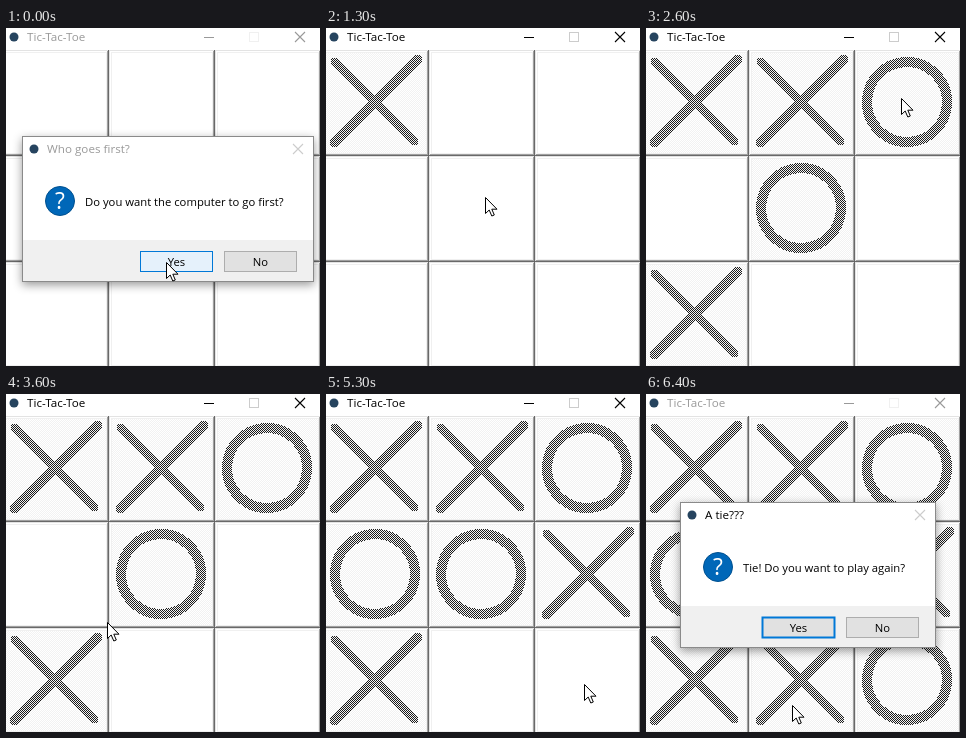
These frames come from a looping animation (314 by 338 pixels, 6500 ms). An HTML page:

```html
<!DOCTYPE html>
<html lang="en">
<head>
<meta charset="utf-8">
<title>Noughts and crosses</title>
<style>
  html, body { margin: 0; width: 100%; height: 100%; overflow: hidden; background: #fff; }
  svg { display: block; }
  text { font: 11.27px "Open Sans", "Noto Sans", sans-serif; white-space: pre; }
  .title { font-size: 11.65px; }
  .mid { text-anchor: middle; }
  .dialog { filter: drop-shadow(0 3px 5px rgba(0, 0, 0, .4)); }
  .crisp { shape-rendering: crispEdges; }
</style>
</head>
<body>
<svg id="stage" width="314" height="338" viewBox="0 0 314 338"></svg>
<script>
const LOOP = 6500, STEP = 100;

// [time, x, y] of the pointer tip
const path = [
  [0, 160, 234], [500, 158, 237], [900, 158, 237], [1300, 159, 169],
  [2000, 159, 169], [2500, 255, 70], [2800, 255, 70],
  [3300, 150, 285], [3500, 108, 248], [3600, 101, 228], [4000, 49, 184],
  [4500, 49, 184], [4900, 142, 251], [5300, 258, 290], [5900, 258, 290],
  [6400, 146, 311]
];

// [time, mark, column, row]
const moves = [
  [700, 'X', 0, 0], [1400, 'O', 1, 1], [1400, 'X', 1, 0],
  [2600, 'O', 2, 0], [2600, 'X', 0, 2], [4300, 'O', 0, 1],
  [4300, 'X', 2, 1], [5800, 'O', 2, 2], [5800, 'X', 1, 2]
];

const rect = (x, y, w, h, fill, more = '') =>
  `<rect x="${x}" y="${y}" width="${w}" height="${h}" fill="${fill}" ${more}/>`;

const text = (x, y, words, more = '') => `<text x="${x}" y="${y}" ${more}>${words}</text>`;

const cross = (x, y, more) =>
  `<path d="M${x} ${y}l10 10m0-10l-10 10" fill="none" stroke-width="1.1" ${more}/>`;

const icon = (x, y) => `<circle cx="${x}" cy="${y}" r="4.5" fill="#26445f"/>`;

// Raised button with a light top left and a dark bottom right edge
function cell(col, row) {
  return `<g class="crisp" transform="translate(${106 * col - 3} ${106 * row + 22})">
    ${rect(0, 0, 106, 106, '#696969')}${rect(0, 0, 105, 105, '#e3e3e3')}
    ${rect(1, 1, 104, 104, '#a0a0a0')}${rect(1, 1, 103, 103, '#fff')}
    ${rect(2, 2, 102, 102, '#f0f0f0')}${rect(3, 3, 100, 100, '#fff')}</g>`;
}

function mark([, kind, col, row]) {
  const shape = kind === 'X'
    ? '<path d="M9 9L88 88M92 6L8 90" stroke-linecap="round" stroke-width="9"/>'
    : '<circle cx="49" cy="49" r="40" stroke-width="10"/>';
  return `<g class="mark crisp" transform="translate(${106 * col} ${106 * row + 25})">
    <g fill="none" stroke="#1c1c1c">${shape}</g>
    ${rect(0, 0, 100, 100, 'url(#stipple)')}</g>`;
}

function dialog(id, x, w, title, titleFill, question, yesStyle) {
  const right = x + w;
  return `<g id="${id}" class="dialog">
    ${rect(x + .5, 108.5, w - 1, 145, '#fff', 'stroke="#8a8a8a"')}
    ${rect(x + 1, 212, w - 2, 41, '#f0f0f0')}
    ${icon(x + 12, 121)}
    ${text(x + 25, 125, title, `class="title" fill="${titleFill}"`)}
    ${cross(right - 21, 116, 'stroke="#ccc"')}
    <circle cx="${x + 38}" cy="173" r="14.5" fill="#0067b8" stroke="#00508f"/>
    ${text(x + 38, 181, '?', 'class="mid" fill="#fff" style="font-size:23px"')}
    ${text(x + 63, 178, question)}
    ${rect(right - 173.5, 223.5, 72, 20, '#e1e1e1', yesStyle)}
    ${rect(right - 89.5, 223.5, 72, 20, '#e1e1e1', 'stroke="#adadad"')}
    ${text(right - 137.5, 238, 'Yes', 'class="mid"')}
    ${text(right - 53.5, 238, 'No', 'class="mid"')}</g>`;
}

const cells = [...Array(9).keys()].map(i => cell(i % 3, Math.floor(i / 3))).join('');

// The stipple lies on odd pixels of each picture, which starts at an odd height
stage.innerHTML = `
  <defs><pattern id="stipple" width="2" height="2" patternUnits="userSpaceOnUse">
    ${rect(0, 0, 1, 1, '#f2f2f2')}${rect(1, 1, 1, 1, '#f2f2f2')}</pattern></defs>
  ${rect(0, 0, 314, 338, '#fff')}
  ${icon(8, 9)}
  <g id="bar">${text(21, 13, 'Tic-Tac-Toe', 'class="title" stroke="none"')}
    <path d="M198 9.5h10" stroke-width="1"/>${cross(289, 4, '')}</g>
  ${rect(243.5, 4.5, 9, 9, 'none', 'stroke="#ccc" id="maximise"')}
  ${cells}${moves.map(mark).join('')}
  ${dialog('first', 16, 292, 'Who goes first?', '#999',
    'Do you want the computer to go first?', 'stroke="#0078d7" style="fill:#e5f1fb"')}
  ${dialog('tie', 34, 256, 'A tie???', '#000',
    'Tie! Do you want to play again?', 'stroke="#0078d7" stroke-width="2"')}
  <path id="pointer" d="M.5 .5V16.5L4.2 13 6.8 19 9.3 18 6.8 12.2H12Z" fill="#fff" stroke="#000"/>`;

const find = id => document.getElementById(id);
const marks = document.querySelectorAll('.mark');

function pointerAt(t) {
  const i = path.findIndex(p => p[0] >= t);
  if (i < 1) return path[0].slice(1);
  const [t0, x0, y0] = path[i - 1], [t1, x1, y1] = path[i];
  const k = (t - t0) / (t1 - t0);
  return [Math.round(x0 + (x1 - x0) * k), Math.round(y0 + (y1 - y0) * k)];
}

// Dialogs are slightly smaller while they fade
function fade(id, amount) {
  const box = find(id), s = amount < 1 ? .96 : 1;
  box.style.display = amount ? '' : 'none';
  box.style.opacity = amount;
  box.setAttribute('transform', `translate(162 181) scale(${s}) translate(-162 -181)`);
}

function draw(now) {
  const t = Math.floor(now % LOOP / STEP) * STEP;
  const active = t >= 100 && t < 5900;
  find('bar').setAttribute('fill', active ? '#000' : '#999');
  find('bar').setAttribute('stroke', active ? '#000' : '#999');
  find('maximise').setAttribute('stroke', active ? '#ccc' : '#f0f0f0');
  marks.forEach((m, i) => m.style.display = t >= moves[i][0] ? '' : 'none');
  fade('first', t < 100 ? 1 : t < 200 ? .3 : 0);
  fade('tie', t < 5900 ? 0 : t < 6000 ? .3 : 1);
  find('pointer').setAttribute('transform', `translate(${pointerAt(t)})`);
}

const start = performance.now();
function tick() {
  draw(performance.now() - start);
  requestAnimationFrame(tick);
}
tick();
</script>
</body>
</html>
```
